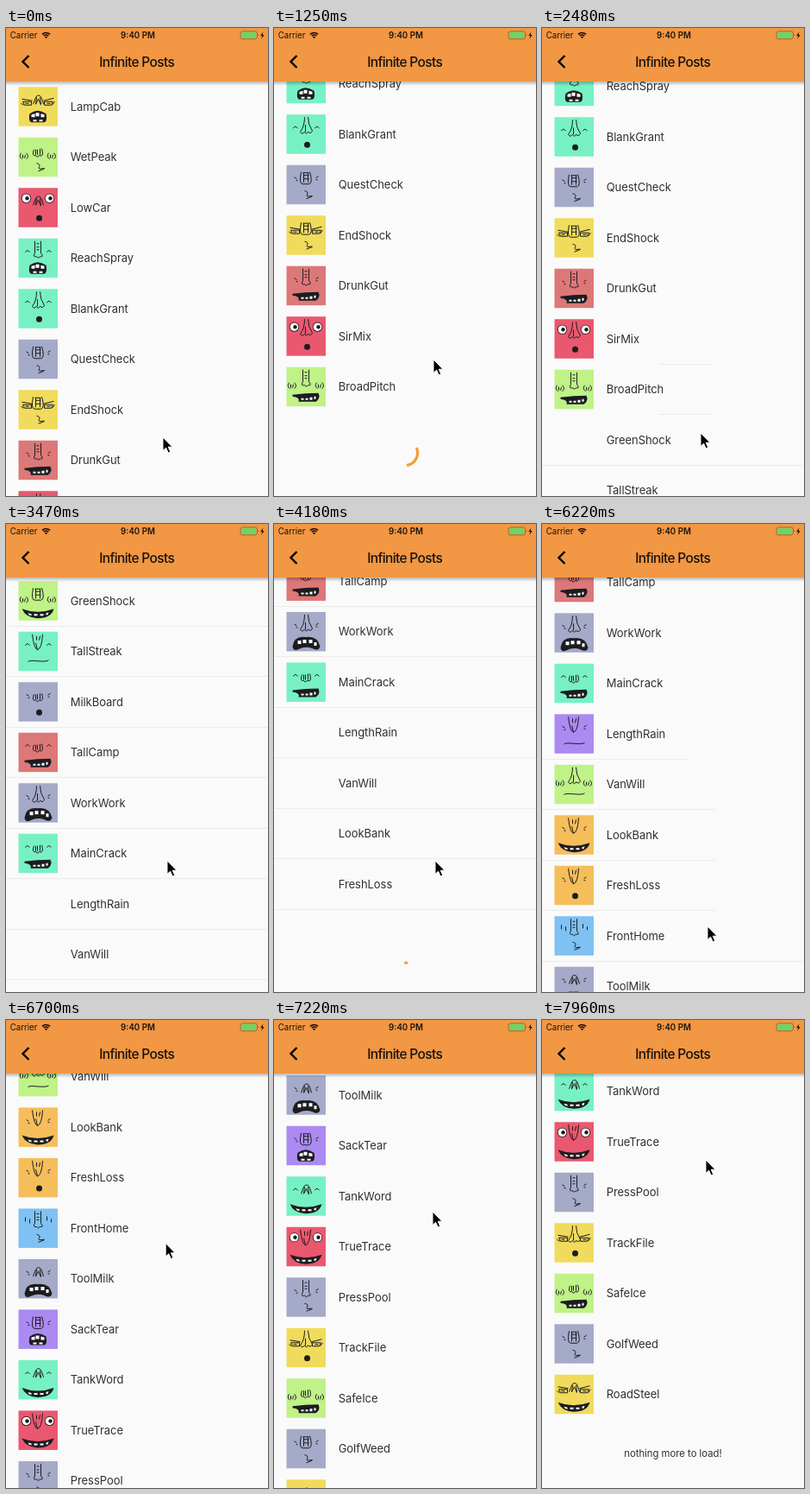
Write an HTML page with a canvas that moves like this. It is 304 px wide and 542 px high and loops after 8000 ms.

```html
<!DOCTYPE html>
<html lang="en">
<head>
<meta charset="utf-8">
<title>Infinite Posts</title>
<style>
html, body { margin: 0; width: 100%; height: 100%; overflow: hidden; background: #fafafa; }
canvas { display: block; width: 304px; height: 542px; }
</style>
</head>
<body>
<canvas></canvas>
<script>
const W = 304, H = 542, LOOP = 8000, PITCH = 58.5, SIZE = 45.5;
const canvas = document.querySelector('canvas');
const g = canvas.getContext('2d');
const dpr = window.devicePixelRatio || 1;
canvas.width = W * dpr;
canvas.height = H * dpr;

const colors = {
  y: '#f0db5c', g: '#bff287', r: '#e9586f', m: '#77f1c4', l: '#a5aac8',
  s: '#dd7878', p: '#ab8af2', o: '#f5be5b', b: '#7fc1f3'
};

// name, then colour + eyes + nose + mouth
const posts = `LampCab ygZo,WetPeak gsUq,LowCar rbZd,ReachSpray maTo,BlankGrant maLd,
QuestCheck ltBq,EndShock ygBq,DrunkGut stTw,SirMix rbLd,BroadPitch gsTw,
GreenShock gsBs,TallStreak maVl,MilkBoard ltUd,TallCamp saUw,WorkWork ltLO,
MainCrack maUw,LengthRain ptVl,VanWill gsLl,LookBank otVs,FreshLoss otVd,
FrontHome bvTq,ToolMilk ltZO,SackTear ptBo,TankWord maZs,TrueTrace rbVs,
PressPool ltTq,TrackFile ygLd,SafeIce gsUw,GolfWeed ltBq,RoadSteel ygZs`
  .split(/,\s*/).map(p => p.split(' '));

const noses = {
  T: 'M19 3V17Q16 22 21 21 23 24 25 21 30 22 26 17V3M21 6h3M21 10h3M21 13h3',
  L: 'M21 3Q21 14 16 20q2 4 5 0q2 4 4 0q3 3 5-1Q25 12 25 3M22 12v8',
  B: 'M17 8Q14 22 19 22H26Q31 21 27 8M19 9h7M20 12h6M20 16h6M20 9V20M25 9V20',
  V: 'M16 3Q18 20 22 21 27 20 28 3M21 5v5M25 5l-1 5M20 13l2 8',
  Z: 'M17 20Q21 8 23 10 26 8 29 20M21 12l-1 8M25 12l1 8M20 20l3-6 3 7',
  U: 'M18 14Q15 22 20 21 22 24 24 21 30 23 27 13M20 14v6M22 14v6M25 13v7'
};
const eyes = {
  g: 'M4 14l12 2M41 13l-12 3M5 17h10v4H7zM30 17h10l-2 4h-8zM3 19l3 2M42 17l-3 4M8 19h4M33 19h4',
  s: 'M3 18q-3 4 1 7M9 18q4 4 0 7M5 20v4M8 20l-1 4M35 18q-3 4 1 7M41 18q4 4 0 7M37 20v4M40 20l-1 4',
  a: 'M8 16q2-4 5 0M33 16q2-4 5 0',
  t: 'M9 14l3 2M11 18h2M37 13l-3 2M34 17h2',
  v: 'M8 10v5M13 12v5M33 9v5M38 12v4'
};
const lines = { q: 'M21 30q5 1 3 4t4 2-5 3', l: 'M11 35q0-2 11-1t13-1' };
const mouths = {
  o: ['M13 31Q22 24 32 31 34 41 29 41H15Q11 40 13 31z',
      'M15 32l4-1v4h-4zM20 30h4v4h-4zM26 31l4 1v3h-4zM17 38h4v2h-4zM24 38h4v2h-4z'],
  O: ['M7 40Q9 27 22 29 36 27 39 40 37 46 30 42 22 39 14 43 8 46 7 40z',
      'M13 33h4v4h-4zM19 32h4v4h-4zM26 32h4v4h-4zM32 35h3v4h-3z'],
  w: ['M7 32Q22 30 37 30 40 36 34 40H14Q16 35 7 34z',
      'M17 36h3v2h-3zM22 36h3v2h-3zM27 35h3v3h-3zM32 34h2v3h-2z'],
  s: ['M4 32Q22 39 41 32 38 43 22 43 8 42 4 32z',
      'M11 37l4 1v2l-3-1zM18 38h4v2h-4zM25 38h4v2h-4zM32 37l3-1-1 3h-2z'],
  d: ['M20.5 35a3.5 3.5 0 1 0 7 0a3.5 3.5 0 1 0-7 0', '']
};

const clamp = x => Math.min(1, Math.max(0, x));
const smooth = x => x * x * (3 - 2 * x);
const span = (t, a, b) => smooth(clamp((t - a) / (b - a)));

function path(d, fill, stroke, width = 1) {
  const p = new Path2D(d);
  if (fill) { g.fillStyle = fill; g.fill(p); }
  if (stroke) { g.strokeStyle = stroke; g.lineWidth = width; g.stroke(p); }
}

function dot(x, y, r, color) {
  g.fillStyle = color;
  g.beginPath();
  g.arc(x, y, r, 0, 7);
  g.fill();
}

function text(str, x, y, font, color, align = 'left', spacing = 0) {
  g.font = font + ' Inter, sans-serif';
  g.letterSpacing = spacing + 'px';
  g.textAlign = align;
  g.textBaseline = 'alphabetic';
  g.fillStyle = color;
  g.fillText(str, x, y);
}

function avatar(x, y, [color, eye, nose, mouth]) {
  const ink = '#1c1c20';
  g.save();
  g.translate(x, y);
  g.fillStyle = colors[color];
  g.fillRect(0, 0, SIZE, SIZE);
  if (eye === 'b') {
    for (const ex of [9, 36]) {
      dot(ex, 12, 5.6, ink);
      dot(ex, 12, 4.8, '#fff');
      dot(ex + 1, 12, 2.2, ink);
    }
  } else path(eyes[eye], null, ink, 1);
  path(noses[nose], null, ink, 1);
  if (lines[mouth]) path(lines[mouth], null, ink, 1);
  else {
    path(mouths[mouth][0], ink);
    path(mouths[mouth][1], '#fff');
  }
  g.restore();
}

// cubic-bezier(.4, 0, .2, 1)
function fastOutSlowIn(x) {
  let a = 0, b = 1, m = 0;
  for (let i = 0; i < 16; i++) {
    m = (a + b) / 2;
    const bx = 1.2 * m * (1 - m) ** 2 + .6 * m * m * (1 - m) + m ** 3;
    if (bx < x) a = m; else b = m;
  }
  return m * m * (3 - 2 * m);
}

function spinner(y, elapsed) {
  const n = elapsed / 1333, step = Math.floor(n), u = n - step;
  const head = fastOutSlowIn(clamp(u * 2)), tail = fastOutSlowIn(clamp(u * 2 - 1));
  const start = Math.PI * (-.5 + 1.5 * tail + 2 * u - .8 * step);
  g.strokeStyle = '#f29c35';
  g.lineWidth = 3.2;
  g.lineCap = 'square';
  g.beginPath();
  g.arc(152, y, 14.6, start, start + Math.max(1.5 * Math.PI * (head - tail), .001));
  g.stroke();
  g.lineCap = 'butt';
}

const scrolls = [
  [660, 1150, 202.5], [1150, 1600, -3.5],
  [2960, 3800, 588], [3800, 4500, -3],
  [6220, 7150, 448.5], [7250, 7960, 121.5]
];
const scrollAt = t => scrolls.reduce((s, [a, b, d]) => s + d * span(t, a, b), 0);

const pointer = [
  [660, 182, 474], [1000, 185, 384], [1500, 185, 384], [2100, 184, 469],
  [2960, 184, 469], [3350, 187, 390], [4600, 187, 390], [5200, 191, 466],
  [5850, 191, 466], [5980, 192, 466], [6240, 192, 466], [6850, 184, 222],
  [7230, 184, 222], [7450, 195, 250], [7850, 190, 162]
];

function pointerAt(t) {
  let [, x, y] = pointer[0];
  for (let i = 1; i < pointer.length; i++) {
    const [a, ax, ay] = pointer[i - 1], [b, bx, by] = pointer[i], k = span(t, a, b);
    x += (bx - ax) * k;
    y += (by - ay) * k;
  }
  return [x, y];
}

function imageTime(i) {
  if (i < 10) return 0;
  if (i < 16) return 2960 + (i - 10) * 60;
  if (i < 20) return 4590 + (i - 16) * 120;
  return i < 22 ? 5820 + (i - 20) * 80 : 6220;
}

// left and right end of the faint rule under a row
function ruleSpan(i, t) {
  if (t < 2310 || t >= 6280) return null;
  if (t < 2960) return i >= 10 ? [0, W] : i >= 8 ? [136, 198] : null;
  if (t < 5820 || i >= 20) return [0, W];
  return i < 16 ? null : [0, i === 16 ? 168 : 201];
}

function list(t) {
  const top = 91 - scrollAt(t);
  const count = t < 2310 ? 10 : t < 5000 ? 20 : 30;
  for (let i = 0; i < count; i++) {
    const y = top + i * PITCH;
    if (y < 20 || y > H + 30) continue;
    const [name, face] = posts[i], rule = ruleSpan(i, t);
    if (t >= imageTime(i)) avatar(14.5, y - SIZE / 2, face);
    text(name, 74.7, y + 4.6, '13px', '#303030', 'left', -.05);
    if (rule) {
      g.fillStyle = '#ebebeb';
      g.fillRect(rule[0], Math.round(y + 28.6), rule[1] - rule[0], 1);
    }
  }
  const end = top + (count - 1) * PITCH;
  if (count === 30) text('nothing more to load!', 152, end + 72.5, '11.3px', '#303030', 'center');
  else spinner(end + 76.5, t - (count === 10 ? 304 : -1072));
}

function header() {
  const shade = g.createLinearGradient(0, 62, 0, 67);
  shade.addColorStop(0, 'rgba(0,0,0,.26)');
  shade.addColorStop(1, 'rgba(0,0,0,0)');
  g.fillStyle = shade;
  g.fillRect(0, 62, W, 5);
  g.fillStyle = '#f29743';
  g.fillRect(0, 0, W, 62);

  const ink = '#17120d';
  text('Carrier', 4.7, 12, '9.7px', ink);
  text('9:40 PM', 153, 12, '600 9.7px', ink, 'center');
  text('Infinite Posts', 151.7, 45, '500 15.5px', ink, 'center', -.65);

  g.strokeStyle = ink;
  g.lineWidth = 1.5;
  for (const r of [3.9, 6.5]) {
    g.beginPath();
    g.arc(46.5, 12, r, -Math.PI * .75, -Math.PI * .25);
    g.stroke();
  }
  path('M46.5 12.3l-1.7-2q1.7-1.3 3.4 0z', ink);
  path('M26.5 32L19.5 39l7 7', null, '#000', 2.4);

  g.strokeStyle = '#8a6238';
  g.lineWidth = .8;
  g.beginPath();
  g.roundRect(272, 3.8, 19.5, 9, 2.4);
  g.stroke();
  g.fillStyle = '#65d765';
  g.beginPath();
  g.roundRect(273.2, 5, 17.1, 6.6, 1.4);
  g.fill();
  path('M292.6 6.8q1.8 1.5 0 3z', '#8a6238');
  path('M298.4 4.4l-3.2 4.4h2l-.9 3.8 3.4-4.6h-2.1z', ink);
}

function cursor(t) {
  g.save();
  g.translate(...pointerAt(t));
  path('M0 0V15.5L3.6 12.2 6.2 18 8.8 16.9 6.3 11.2H11z', '#000', '#fff', 1);
  g.restore();
}

function draw(t) {
  g.setTransform(dpr, 0, 0, dpr, 0, 0);
  g.fillStyle = '#fafafa';
  g.fillRect(0, 0, W, H);
  list(t);
  header();
  cursor(t);
}

const began = performance.now();
function tick() {
  draw((performance.now() - began) % LOOP);
  requestAnimationFrame(tick);
}
tick();
</script>
</body>
</html>
```
